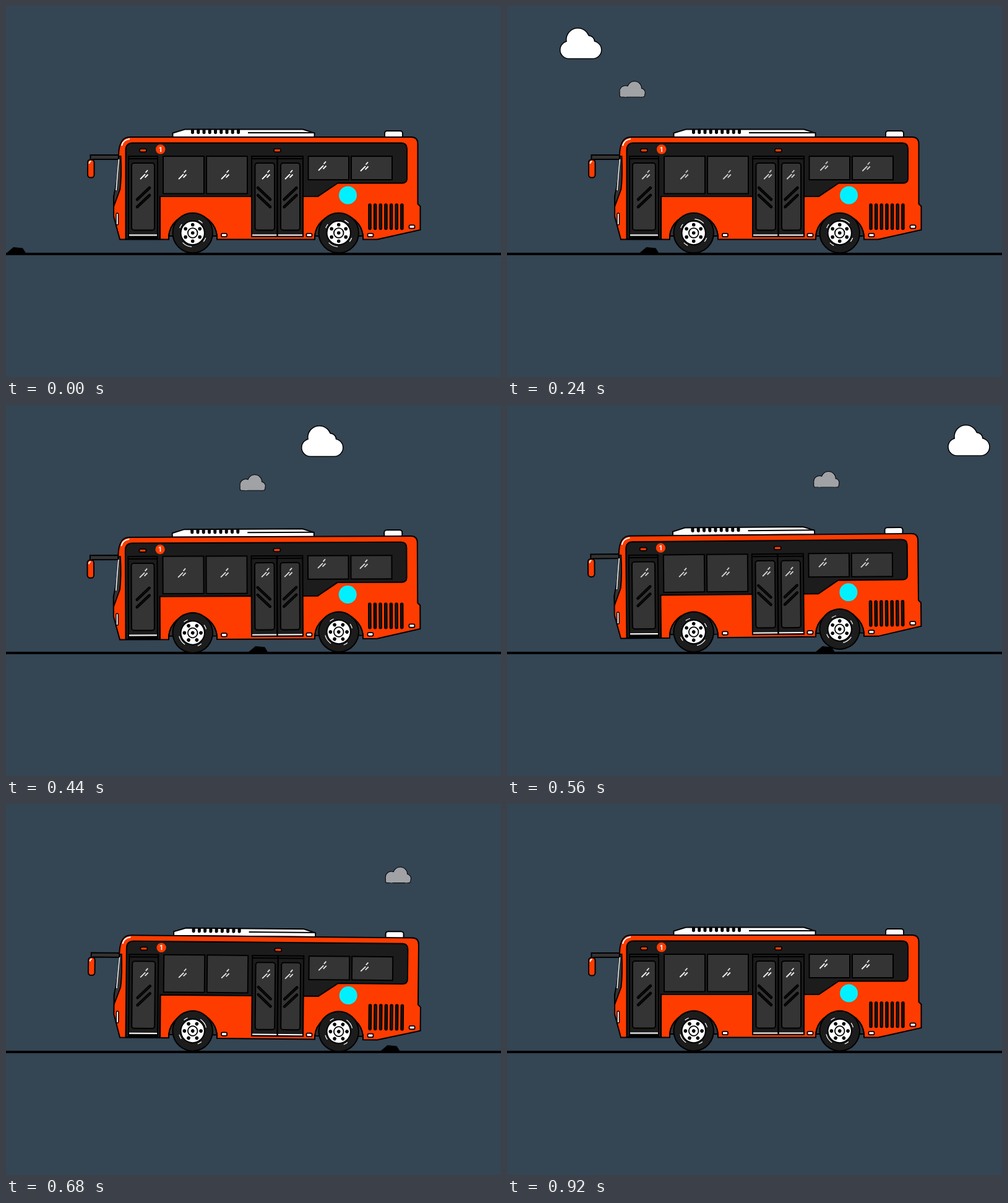
Write an HTML page with a canvas that moves like this. It is 800 px wide and 600 px high and loops after 0.96 s.

```html
<!DOCTYPE html>
<html lang="en">
<head>
<meta charset="utf-8">
<title>Bus ride</title>
<style>
html, body { margin: 0; width: 100%; height: 100%; overflow: hidden; background: #344554; }
canvas { display: block; }
</style>
</head>
<body>
<canvas id="stage" width="800" height="600"></canvas>
<script>
const ctx = document.getElementById('stage').getContext('2d');
const LOOP = 960, STEP = 40;
const SKY = [52, 69, 84];
const ORANGE = '#ff3c00', DARK = '#1c1c1c', GLASS = '#343434', BLACK = '#000', WHITE = '#fff';
const TAU = Math.PI * 2, DEG = Math.PI / 180;

// Body pitch in degrees and wheel lift in pixels, one value per step after meeting the rock
const PITCH = [0, 0.5, 1.3, 0, -0.55, -0.25, 0];
const LIFT = [0, 4.5, 9, 0, -1, -1.5, -1.5, -0.7, 0];
const FRONT_HIT = 6, REAR_HIT = 13;

// time, dx, dy, opacity of the window reflections
const GLINT = [
  [0, 0, 0, 1], [240, 1.3, 0, 0.75], [360, -0.8, -4, 0.88], [560, 0, -1, 0.8],
  [680, -0.8, 0, 0.88], [760, 1, 0, 0.65], [920, 0.4, 0, 0.92], [960, 0, 0, 1]
];

const clamp = (v) => Math.max(0, Math.min(1, v));
const mix = (a, b, k) => a + (b - a) * k;
const blend = (rgb, k) => `rgb(${rgb.map((c, i) => Math.round(mix(SKY[i], c, k)))})`;

function paint(fill, stroke = BLACK, width = 2) {
  if (fill) { ctx.fillStyle = fill; ctx.fill(); }
  if (stroke) { ctx.strokeStyle = stroke; ctx.lineWidth = width; ctx.stroke(); }
}

function shape(d, fill, stroke, width) {
  const path = new Path2D(d);
  if (fill) { ctx.fillStyle = fill; ctx.fill(path); }
  if (stroke) { ctx.strokeStyle = stroke; ctx.lineWidth = width || 2; ctx.stroke(path); }
}

function box(x1, y1, x2, y2, r, fill, stroke, width) {
  ctx.beginPath();
  ctx.roundRect(x1, y1, x2 - x1, y2 - y1, r);
  paint(fill, stroke, width);
}

function disc(x, y, r, fill, stroke = null, width) {
  ctx.beginPath();
  ctx.arc(x, y, r, 0, TAU);
  paint(fill, stroke, width);
}

function line(x1, y1, x2, y2, color, width, cap = 'butt') {
  ctx.lineCap = cap;
  ctx.beginPath();
  ctx.moveTo(x1, y1);
  ctx.lineTo(x2, y2);
  paint(null, color, width);
  ctx.lineCap = 'butt';
}

// Lobes are [x, y, radius]; the base is a box, all clipped at a flat bottom
function cloud(x, y, lobes, base, fill, edge, width) {
  const path = new Path2D();
  for (const [cx, cy, r] of lobes) {
    path.moveTo(cx + r, cy);
    path.arc(cx, cy, r, 0, TAU);
  }
  path.roundRect(...base);
  ctx.save();
  ctx.translate(x, y);
  ctx.beginPath();
  ctx.rect(-5, -5, 90, base[1] + base[3] + width / 2 + 5);
  ctx.clip();
  ctx.strokeStyle = edge;
  ctx.lineWidth = width;
  ctx.stroke(path);
  ctx.fillStyle = fill;
  ctx.fill(path);
  ctx.restore();
}

function clouds(t) {
  cloud(86 + (t - 240) * 1.96, 36.5 - (t - 240) * 0.0105,
    [[14, 34.5, 13.5], [28.5, 18, 18], [45.5, 21.5, 9.5], [52.5, 34.5, 13.5]],
    [12, 24, 42, 24, 2], WHITE, BLACK, 3);
  const k = clamp(Math.min(t / 160, (860 - t) / 180));
  cloud(182 + (t - 240) * 0.98, 121.7 - (t - 240) * 0.0446,
    [[9.5, 16.5, 9], [24, 11.5, 11], [34, 18.5, 6.8]],
    [0.7, 16, 39.5, 9, [0, 0, 3, 2]], blend([160, 162, 165], k), blend([0, 0, 0], k), 2);
}

function glintAt(t) {
  const i = GLINT.findIndex((g, n) => n > 0 && t < g[0]);
  const a = GLINT[i - 1], b = GLINT[i], k = (t - a[0]) / (b[0] - a[0]);
  return a.map((v, n) => mix(v, b[n], k));
}

function glints(t) {
  const [, dx, dy, alpha] = glintAt(t);
  ctx.save();
  ctx.globalAlpha = alpha;
  for (const [x, y] of [[223, 273], [285, 273], [354, 273], [420, 273], [457, 273], [511, 259], [579, 260]]) {
    const gx = x + dx, gy = y + dy;
    line(gx - 6, gy + 7, gx + 2, gy - 1, WHITE, 1.8);
    line(gx + 2.5, gy - 3.5, gx + 6, gy - 7.5, WHITE, 1.8);
    line(gx + 1.5, gy + 4.5, gx + 6.5, gy - 0.5, WHITE, 1.8);
  }
  ctx.restore();
}

function handles(x, dir) {
  for (const y of [303.5, 315.5]) {
    line(x - 10 * dir, y + 9.5, x + 10 * dir, y - 9.5, BLACK, 4.5, 'round');
    line(x - 10 * dir, y + 9.5, x + 10 * dir, y - 9.5, '#161616', 1, 'round');
  }
}

function roof() {
  shape('M269.5 212V205.5L289 199.5H480L498.5 205.5V212Z', WHITE, BLACK);
  for (let i = 0; i < 9; i++) line(301.5 + i * 9.25, 201, 301.5 + i * 9.25, 204.5, BLACK, 5, 'round');
  line(391, 205, 498, 205, BLACK, 2);
  box(612, 202, 641, 214, 4, WHITE);
}

function mirror() {
  shape('M136.5 250V241H184V248H140V250Z', GLASS, BLACK);
  box(132, 248.5, 142.5, 277.5, 4.5, ORANGE);
  shape('M134.5 255Q134.5 251.5 137.5 251', null, WHITE, 1.8);
}

function body() {
  shape('M184 377.5L174 340V308Q181 285 182 240Q183 212 200 212H655Q665.500 212 665.500 223V320L669.500 324V362L600 377.500H577V372' +
    'A39.200 39.500 0 0 0 499 372V377.500H341V372A39.200 39.500 0 0 0 263 372V377.500Z', ORANGE, BLACK);
  for (const x of [302, 538]) {
    shape(`M${x - 39} 372A39.2 39.5 0 0 1 ${x + 39} 372Z`, GLASS, BLACK);
  }
  shape('M182.500 243H185.500Q187 275 184.500 296L175 322Q172.500 308 177 295Q181.500 270 182.500 243Z', GLASS, BLACK, 1.8);
  line(182.3, 248, 178, 298, WHITE, 1.5);
  shape('M187 226Q189 216 200 215', null, WHITE, 2);
  box(178, 335, 181.5, 354, 1.5, WHITE, BLACK, 1.5);

  shape('M193.500 377V233Q193.500 221.500 205 221.500H639Q648 221.500 648 231V279Q648 286.500 640 286.500H536' +
    'L504 308H249V377Z', DARK, BLACK);
}

function doors() {
  box(198, 243, 245, 376, 0, DARK);
  line(198, 247, 245, 247, BLACK, 2);
  box(203, 254, 240, 362.5, 4, GLASS);
  handles(222, 1);
  line(199, 370.5, 244, 370.5, WHITE, 2);
  line(198, 374.5, 245, 374.5, BLACK, 3);

  box(397, 243, 480, 373, 0, DARK);
  line(397, 247, 480, 247, BLACK, 2);
  box(402.5, 254, 434, 362.5, 4, GLASS);
  box(444, 254, 475, 362.5, 4, GLASS);
  handles(417, -1);
  handles(459.5, 1);
  line(398, 370.5, 479, 370.5, WHITE, 2);
  line(438.5, 243, 438.5, 373, BLACK, 2.5);
}

function details() {
  box(254, 243, 320, 303.5, 0, GLASS);
  box(324, 243, 390, 303.5, 0, GLASS);
  box(488.5, 243, 554, 281, 0, GLASS);
  box(558, 243, 624, 281, 0, GLASS);

  for (const x of [221.5, 438.5]) box(x - 5.5, 231, x + 5.5, 236, 2.2, ORANGE, BLACK, 1.7);
  disc(249.7, 231.7, 7.7, ORANGE);
  ctx.fillStyle = WHITE;
  ctx.font = 'bold 11px Inter, sans-serif';
  ctx.textAlign = 'center';
  ctx.fillText('1', 249.3, 235.5);

  disc(552.5, 306, 14.5, '#00f0ff');

  for (let i = 0; i < 7; i++) {
    const x = 588 + i * 8.65;
    line(x, 322, x, 359.5, BLACK, 5.5, 'round');
    line(x, 322, x, 359.5, DARK, 1.8);
  }
  for (const [x, y] of [[352.5, 370.5], [490, 370.5], [589, 370.5], [656, 357]]) {
    box(x - 4.5, y - 2.7, x + 4.5, y + 2.7, 2, WHITE, BLACK, 1.8);
  }
}

function wheel(x, y, spin) {
  ctx.save();
  ctx.translate(x, y);
  ctx.rotate(-spin);
  disc(0, 0, 32.3, DARK, BLACK);
  for (const [angle, half] of [[245, 21], [330, 9], [55, 10], [150, 9]]) {
    ctx.beginPath();
    ctx.arc(0, 0, 22.5, (-angle - half) * DEG, (-angle + half) * DEG);
    paint(null, WHITE, 1.2);
  }
  disc(0, 0, 19.2, WHITE, BLACK);
  for (let i = 0; i < 6; i++) {
    const a = (30 + i * 60) * DEG;
    disc(13.3 * Math.cos(a), 13.3 * Math.sin(a), 2.8, BLACK);
  }
  disc(0, 0, 7.8, WHITE, BLACK, 1.8);
  disc(0, 0, 2.8, BLACK);
  ctx.restore();
}

function tilt(x, y, degrees) {
  ctx.translate(x, y);
  ctx.rotate(degrees * DEG);
  ctx.translate(-x, -y);
}

function ground(t) {
  line(0, 401, 800, 401, BLACK, 4);
  const x = -1 + t * 0.889;
  shape(`M${x} 401l13 -11l15 1.500l6 9.500Z`, BLACK);
}

function draw(t) {
  const step = t / STEP;
  const after = (list, hit) => list[step - hit] || 0;
  ctx.fillStyle = blend(SKY, 1);
  ctx.fillRect(0, 0, 800, 600);
  clouds(t);

  ctx.save();
  tilt(670, 377, after(PITCH, FRONT_HIT));
  tilt(184, 377, -after(PITCH, REAR_HIT));
  mirror();
  roof();
  body();
  doors();
  details();
  glints(t);
  ctx.restore();

  ground(t);
  const spin = t / LOOP * 2 * TAU;
  wheel(301.7, 367 - after(LIFT, FRONT_HIT), spin);
  wheel(537.7, 367 - after(LIFT, REAR_HIT), spin);
}

function tick() {
  const t = performance.now() % LOOP;
  draw(Math.floor(t / STEP) * STEP);
  requestAnimationFrame(tick);
}
tick();
</script>
</body>
</html>
```
